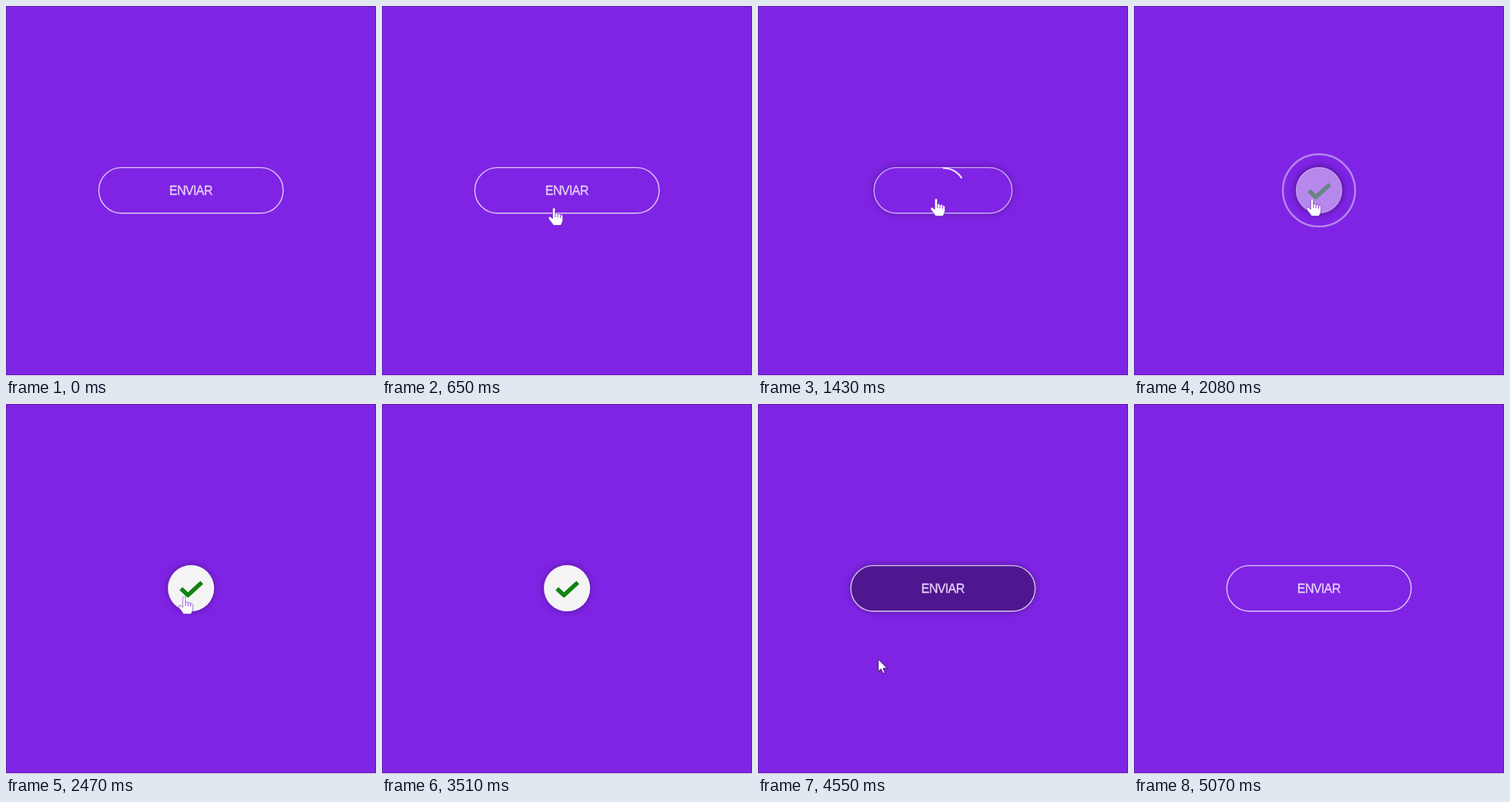
An HTML page for the animation above (5.2 s loop, 480 by 480 pixels).

```html
<!DOCTYPE html>
<html lang="pt">
<head>
<meta charset="utf-8">
<title>Enviar</title>
<style>
  html, body { margin: 0; width: 100%; height: 100%; overflow: hidden; background: #f6f0fc; }
  #stage { position: relative; width: 480px; height: 479px; overflow: hidden; box-sizing: border-box;
    background: #7f24e4; border: 1px solid #621eaf; }
  #button { position: absolute; top: 208px; height: 60px; border-radius: 30px; }
  svg { position: absolute; left: -1px; top: -1px; }
  text { font: 16px "Liberation Sans", Arial, sans-serif; letter-spacing: -.65px;
    fill: #e6d3fa; stroke: #e6d3fa; stroke-width: .35; }
</style>
</head>
<body>
<div id="stage">
  <div id="button"></div>
  <svg width="480" height="480" fill="none">
    <rect id="outline" y="209.6" height="59.2" rx="29.6" stroke="#fff" stroke-width="1.4"/>
    <text id="label" x="239.7" y="245" text-anchor="middle">ENVIAR</text>
    <circle id="arc" cx="240" cy="239.2" r="29" stroke="#f4effc" stroke-width="2"
      pathLength="1" transform="rotate(-90 240 239.2)"/>
    <circle id="ring" cx="240" cy="239.2" stroke="#f4f4f4" stroke-width="2.5"/>
    <path id="check" d="M227 239.5L236 248L254 231.5" stroke="#118211" stroke-width="5.5" stroke-linejoin="round"/>
    <g id="hand">
      <path fill="#fff" stroke="#5a18a8" stroke-width=".6" d="M-1.7 1Q0 -1.5 1.7 1V7Q3.5 5.8 5 7.8Q7 6.8 8.3 8.6
        Q10.5 7.8 11.6 10.5V16Q11 19 9 22.5H-.5Q-3 19 -6.5 14.5Q-8 11.5 -5.5 11.2Q-3.5 11.5 -1.7 14Z"/>
      <path stroke="#7f24e4" stroke-width=".9" d="M1.8 7V12M5.1 8V12.5M8.4 9V13"/>
    </g>
    <path id="arrow" fill="#fff" stroke="#35106a" stroke-linejoin="round"
      d="M0 0V16L3.6 12.8L6.2 18.5L8.8 17.4L6.3 11.9H11.6Z"/>
  </svg>
</div>
<script>
  const LOOP = 5200, STEP = 130;
  const CLICK = 1430, HIDE = 3510;
  const [button, outline, label, arc, ring, check, hand, arrow] =
    ["button", "outline", "label", "arc", "ring", "check", "hand", "arrow"].map(id => document.getElementById(id));

  const show = (node, on) => { node.style.visibility = on ? "visible" : "hidden"; };

  function render(t) {
    // Progress from 0 to 1 over a span of time.
    const ramp = (from, span) => Math.min(1, Math.max(0, (t - from) / span));
    const clicked = t >= CLICK;

    const over = ramp(650, 390) - ramp(4550, 520);
    const shrink = ramp(1300, 390);
    const grow = ramp(3770, 520);
    const done = ramp(1950, 270);
    const small = shrink - grow;
    const white = done - grow;

    // Button
    const width = 240 - 180 * small;
    const dark = over * (clicked ? grow : 1);
    const shadow = 0.4 * over + done * (1 - done);
    const cover = `rgba(244,244,244,${white})`;
    Object.assign(button.style, {
      left: 239 - width / 2 + "px",
      width: width + "px",
      background: `linear-gradient(${cover}, ${cover}), rgba(78,23,144,${dark})`,
      boxShadow: `0 0 10px rgba(30,5,60,${shadow})`
    });
    outline.setAttribute("x", 240.4 - width / 2);
    outline.setAttribute("width", width - 0.8);
    outline.style.opacity = 0.75 * (1 - white) * (1 - 0.5 * small);
    label.style.opacity = clicked ? ramp(4030, 390) : 1;
    check.style.opacity = white;

    // Loading arc, then a ring that spreads and fades
    show(arc, clicked && done < 0.5 && t < 2080);
    arc.setAttribute("stroke-dasharray", `${ramp(1332, 618)} 2`);
    show(ring, t >= 1950 && done < 1);
    ring.setAttribute("r", 30 + 35 * done);
    ring.style.opacity = 0.9 * (1 - done);

    // Pointer: slows down onto the button, later leaves in a straight line
    const away = (1 - ramp(130, 650)) ** 2;
    const leave = ramp(4290, 780);
    const place = `translate(${231 - 200 * away - 225 * leave} ${250 + 300 * away + 243 * leave})`;
    hand.setAttribute("transform", place);
    arrow.setAttribute("transform", place);
    const onButton = t >= 650 && leave < 0.3;
    show(hand, onButton && (t < HIDE || grow > 0.5));
    show(arrow, !onButton && away < 1 && leave < 1);
  }

  const start = performance.now();
  function tick(now) {
    const t = Math.max(0, now - start) % LOOP;
    render(Math.floor(t / STEP) * STEP);
    requestAnimationFrame(tick);
  }
  render(0);
  requestAnimationFrame(tick);
</script>
</body>
</html>
```
